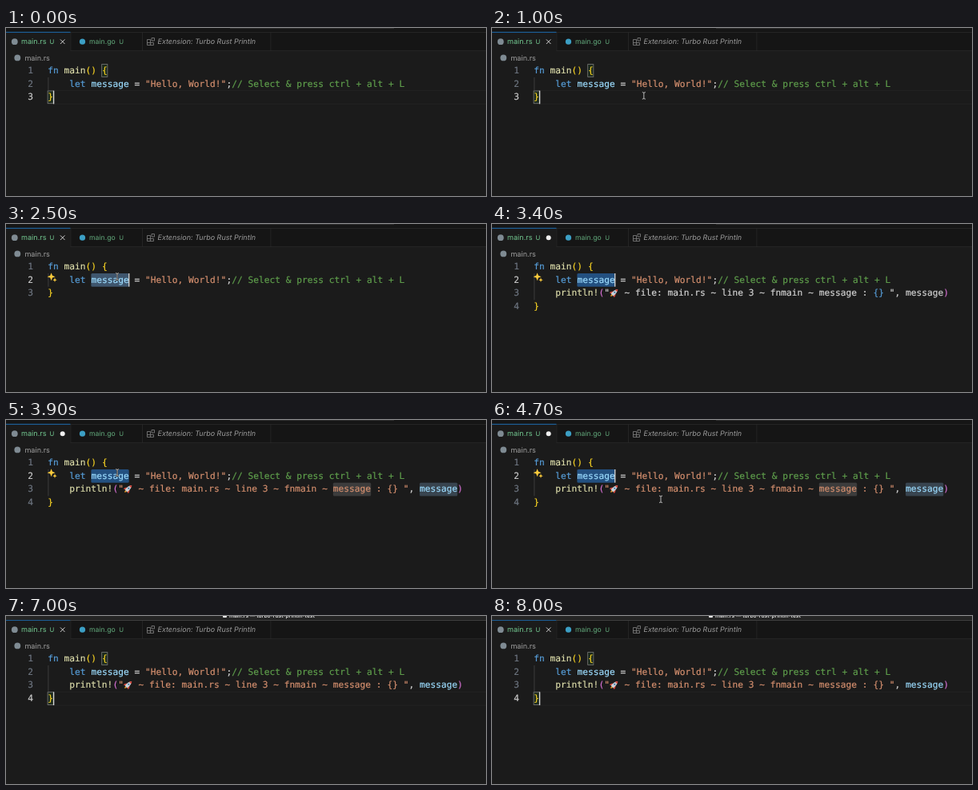
An HTML page that plays this animation: 600 by 211 pixels, repeating every 8100 ms.

```html
<!DOCTYPE html>
<html lang="en">
<head>
<meta charset="utf-8">
<title>Println shortcut</title>
<style>
html, body { margin: 0; width: 100%; height: 100%; overflow: hidden; background: #1b1b1b; }
svg { display: block; width: 600px; height: 211px; }
text { white-space: pre; text-rendering: geometricPrecision; }
.code { font: 11.23px "DejaVu Sans Mono", monospace; stroke-width: .18px; }
.ui { font: 9.1px Inter, sans-serif; stroke: none; }
.badge { font: 7.8px Inter, sans-serif; stroke: none; }
</style>
</head>
<body>
<svg id="stage" viewBox="0 0 600 211"></svg>
<script>
const LOOP = 8100, COL = 6.76, LEFT = 52.3, ROW = 16.7, TOP = 45.3, BASE = 11.5, EMOJI = 11.8;
const SELECT = 1400, OCCUR = 1800, INSERT = 3300, PARSED = 3700, CLICK = 5000, SAVE = 5400, MENU = 7000;
const C = {
  key: '#569cd6', fn: '#dcdcaa', gold: '#f9d423', pink: '#d670d2', name: '#9cdcfe',
  str: '#d6906f', note: '#5f9f4c', plain: '#d4d4d4', git: '#73c991'
};
const stage = document.getElementById('stage');

const colX = c => LEFT + c * COL;
const rowY = r => TOP + (r - 1) * ROW;
const rect = (x, y, w, h, fill, more = '') =>
  `<rect x="${x}" y="${y}" width="${w}" height="${h}" fill="${fill}" ${more}/>`;
const path = (d, stroke, w = 1, fill = 'none') =>
  `<path d="${d}" stroke="${stroke}" stroke-width="${w}" fill="${fill}"/>`;
const dot = (x, y, r, fill) => `<circle cx="${x}" cy="${y}" r="${r}" fill="${fill}"/>`;
const text = (kind, x, y, s, fill, more = '') =>
  `<text class="${kind}" x="${x}" y="${y}" fill="${fill}" stroke="${fill}" ${more}>${s.replace(/&/g, '&amp;')}</text>`;

// Lays out [string, colour] tokens from a column; returns markup.
function code(row, col, tokens, shift = 0) {
  return tokens.map(([s, fill]) => {
    const out = text('code', colX(col) + shift, rowY(row) + BASE, s, fill);
    col += s.length;
    return out;
  }).join('');
}

const box = (row, col, n, fill, shift = 0) =>
  rect(colX(col) + shift, rowY(row), n * COL, ROW, fill, 'rx="1.5"');
const bracketBox = (row, col) =>
  rect(colX(col) - .2, rowY(row) + .3, COL + .4, ROW - 1, '#1d2a1d', 'stroke="#7c7c7c" stroke-width=".8"');

const rocket = `<g transform="translate(152.6 86.5) rotate(45)">
  <path d="M-2-1L-4 2V4L-1 3ZM2-1L4 2V4L1 3Z" fill="#cf4338"/>
  <path d="M-1.4 3.5L0 6.5L1.4 3.5Z" fill="#f5a52a"/>
  <path d="M0-6.5Q3-3 2 3.5H-2Q-3-3 0-6.5Z" fill="#cbd3da"/>
  <path d="M0-6.5Q1.5-5 1.9-3.5H-1.9Q-1.5-5 0-6.5Z" fill="#cf4338"/>
  <circle cy="-1" r="1.1" fill="#3d78a8"/></g>`;

const star = (x, y, r) => {
  const q = r * .28;
  return path(`M${x} ${y - r}L${x + q} ${y - q}L${x + r} ${y}L${x + q} ${y + q}L${x} ${y + r}L${x - q} ${y + q}L${x - r} ${y}L${x - q} ${y - q}Z`, 'none', 0, '#fbcb3c');
};
const sparkles = star(56.6, 66.2, 5) + star(61, 70.2, 2.8);

const frame =
  rect(0, 0, 600, 211, '#1b1b1b') + rect(0, 0, 600, 29, '#151515') +
  rect(0, 5, 80.5, 24, '#1b1b1b') + rect(0, 5, 600, .8, '#292929') +
  rect(80.5, 28.2, 519.5, .8, '#292929') +
  [80.5, 170, 330.5].map(x => rect(x, 5, .8, 24, '#292929')).join('') +
  rect(0, 4.8, 80.5, 1, '#1b6cb0') +
  dot(10.8, 17.2, 3.9, '#7f8b93') + text('ui', 19, 20.3, 'main.rs', C.git) + text('badge', 54.6, 20, 'U', C.git) +
  dot(95.5, 17.2, 3.6, '#3c9fc4') + text('ui', 104, 20.3, 'main.go', '#62a97b', 'style="font-size:8.7px"') +
  text('badge', 141.3, 20, 'U', '#62a97b') +
  path('M176.5 14.5H180.5V18.5H184.5V21.5H176.5ZM176.5 18.5H180.5V21.5M182 12.5H185.5V16H182Z', '#858585', .8) +
  text('ui', 189.5, 20.3, 'Extension: Turbo Rust Println', '#9b9b9b', 'style="font-size:9px;font-style:italic"') +
  dot(14.3, 37.4, 3.9, '#7f8b93') + text('ui', 23.4, 40.5, 'main.rs', '#a0a0a0');

const menuBar = rect(0, 0, 600, 4.8, '#252525') + rect(80.5, 5, 519.5, .8, '#454545') +
  rect(271, -4, 5, 6, '#e6e6e6', 'rx="1"') +
  text('ui', 279, 1.6, 'main.rs — turbo-rust-println-test', '#dedede', 'style="font-size:6.7px;font-weight:600"');

// Pointer runs: [ms, x, y], straight moves between the points.
const runs = [
  [[100, 425, 152], [300, 424, 152], [600, 190, 85], [1000, 190, 85], [1300, 139, 66], [INSERT, 139, 66]],
  [[3900, 139, 66], [4500, 211, 99.5], [6200, 211, 99.5], [6400, 250, 130], [6700, 300, 90], [MENU, 335, -6]]
];
function pointer(t) {
  for (const run of runs) {
    const i = run.findIndex(p => p[0] > t);
    if (i < 1) continue;
    const [a, b] = [run[i - 1], run[i]], k = (t - a[0]) / (b[0] - a[0]);
    const x = a[1] + (b[1] - a[1]) * k, y = a[2] + (b[2] - a[2]) * k;
    const beam = `M${x - 2} ${y - 4.3}Q${x} ${y - 4.3} ${x} ${y - 3}V${y + 3}Q${x} ${y + 4.3} ${x - 2} ${y + 4.3}M${x + 2} ${y - 4.3}Q${x} ${y - 4.3} ${x} ${y - 3}M${x} ${y + 3}Q${x} ${y + 4.3} ${x + 2} ${y + 4.3}`;
    return path(beam, '#222', 2) + path(beam, '#c4c4c4', .9);
  }
  return '';
}

function println(parsed) {
  const s = parsed ? C.str : C.plain;
  return code(3, 4, [['println!', C.fn], ['(', C.pink], ['"', s]]) + rocket +
    code(3, 14, [[' ~ file: main.rs ~ line 3 ~ fnmain ~ message : ', s], ['{}', parsed ? s : C.key],
      [' "', s], [', ', C.plain], ['message', parsed ? C.name : C.plain], [')', C.pink]], EMOJI);
}

function draw(t) {
  const selected = t >= SELECT && t < CLICK;
  const inserted = t >= INSERT, last = inserted ? 4 : 3, active = selected ? 2 : last;
  const reset = [CLICK, INSERT, SELECT, 0].find(m => t >= m);
  const lit = Math.floor((t - reset) / 500) % 2 === 0;
  let out = frame;

  out += t >= MENU ? menuBar : rect(280, 0, 205, .8, '#353535');
  out += inserted && t < SAVE ? dot(70.7, 17.2, 3, '#f0f0f0')
    : path('M67.9 14.4L73.5 20M73.5 14.4L67.9 20', '#e0e0e0', .9);

  if (selected) {
    const grey = t >= OCCUR && t < INSERT;
    out += box(2, 8, 7, grey ? '#3f566e' : '#235080');
    if (t >= PARSED) out += box(3, 51, 7, '#3c3c3c', EMOJI) + box(3, 67, 7, '#38444f', EMOJI);
  } else {
    out += rect(LEFT, rowY(last), 560, ROW, 'none', 'stroke="#242424" stroke-width=".8"') +
      bracketBox(1, 10) + bracketBox(last, 0);
  }
  out += rect(52.5, rowY(2), .8, inserted ? 2 * ROW : ROW, '#454545');
  if (selected && t >= OCCUR) out += sparkles;

  for (let n = 1; n <= last; n++)
    out += text('code', 27.2, rowY(n) + BASE, '' + n, n === active ? '#cccccc' : '#6e7681');

  out += code(1, 0, [['fn ', C.key], ['main', C.fn], ['()', C.gold], [' ', C.plain], ['{', C.gold]]);
  out += code(2, 4, [['let ', C.key], ['message', C.name], [' = ', C.plain], ['"Hello, World!"', C.str],
    [';', C.plain], ['// Select & press ctrl + alt + L', C.note]]);
  if (inserted) out += println(t >= PARSED);
  out += code(last, 0, [['}', C.gold]]);

  if (lit) out += rect(selected ? colX(15) - .6 : colX(1) - .1, rowY(active), 1.3, ROW, '#d8d8d8');
  return out + pointer(t);
}

let shown = '';
function tick() {
  const next = draw(performance.now() % LOOP);
  if (next !== shown) stage.innerHTML = shown = next;
  requestAnimationFrame(tick);
}
tick();
</script>
</body>
</html>
```
